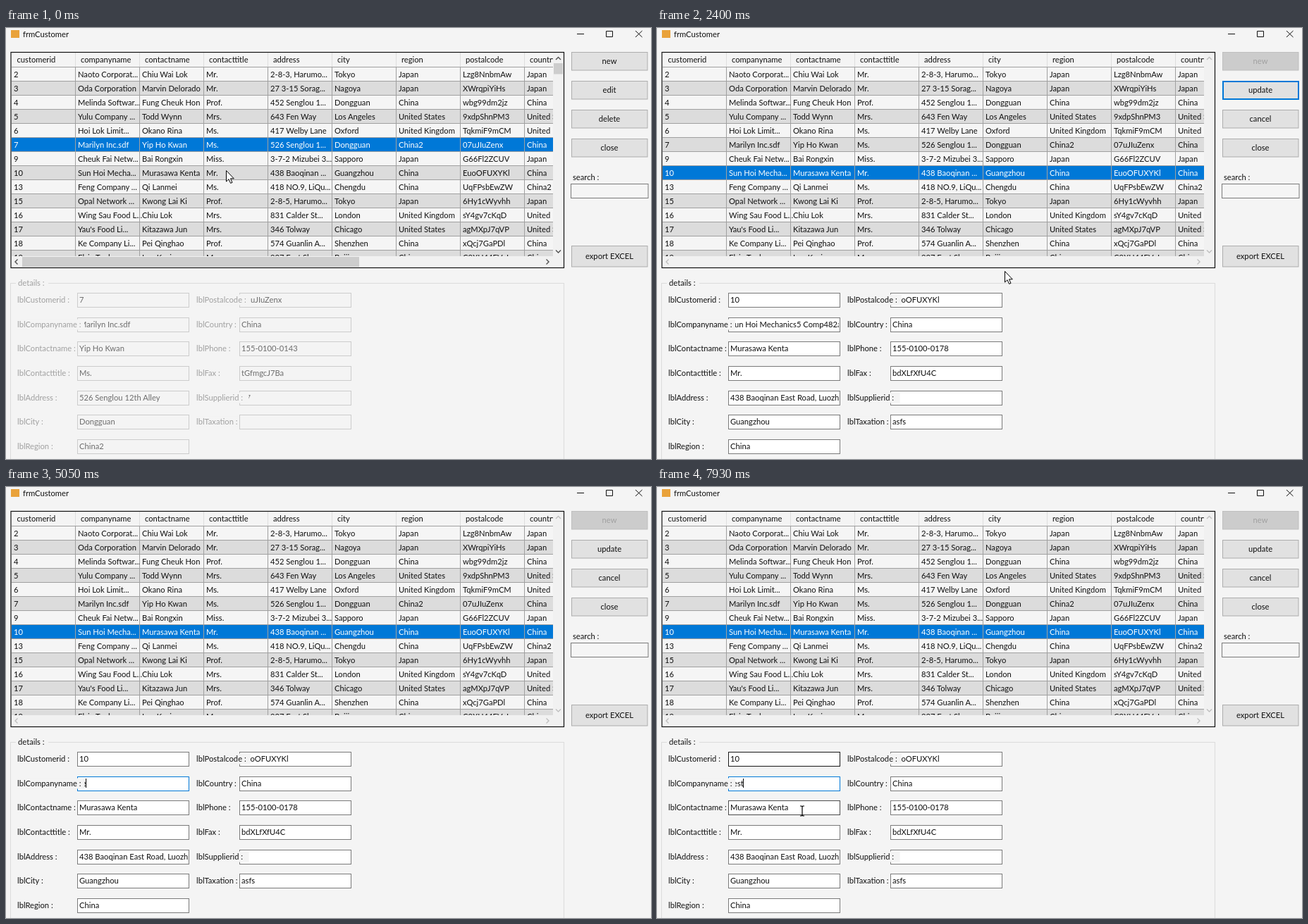
Animation of 915x612 px, one loop 8 s. Source, as an HTML page:

```html
<!DOCTYPE html>
<html lang="en">
<head>
<meta charset="utf-8">
<title>frmCustomer</title>
<style>
  html, body { margin: 0; width: 100%; height: 100%; overflow: hidden; background: #f4f4f4; }
  svg { display: block; }
  text { font: 11.2px Lato, "Open Sans", sans-serif; white-space: pre; }
</style>
</head>
<body>
<svg id="stage" width="915" height="612" viewBox="0 0 915 612"></svg>
<script>
const stage = document.getElementById("stage");
const LOOP = 8000;
const BG = "#f4f4f4", BLUE = "#0078d7", INK = "#111", HOVER = "#171717", FADE = "#4c4c4c";

const HEADERS = ["customerid", "companyname", "contactname", "contacttitle", "address", "city", "region", "postalcode", "country"];
const EDGES = [8, 99, 190, 281, 372, 463, 554, 645, 736];
const ROWS = `2|Naoto Corporat...|Chiu Wai Lok|Mr.|2-8-3, Harumo...|Tokyo|Japan|Lzg8NnbmAw|Japan
3|Oda Corporation|Marvin Delorado|Mr.|27 3-15 Sorag...|Nagoya|Japan|XWrqpiYiHs|Japan
4|Melinda Softwar...|Fung Cheuk Hon|Prof.|452 Senglou 1...|Dongguan|China|wbg99dm2jz|China
5|Yulu Company ...|Todd Wynn|Mrs.|643 Fen Way|Los Angeles|United States|9xdpShnPM3|United States
6|Hoi Lok Limit...|Okano Rina|Ms.|417 Welby Lane|Oxford|United Kingdom|TqkmiF9mCM|United Kingdom
7|Marilyn Inc.sdf|Yip Ho Kwan|Ms.|526 Senglou 1...|Dongguan|China2|07uJIuZenx|China
9|Cheuk Fai Netw...|Bai Rongxin|Miss.|3-7-2 Mizubei 3...|Sapporo|Japan|G66Fl2ZCUV|Japan
10|Sun Hoi Mecha...|Murasawa Kenta|Mr.|438 Baoqinan ...|Guangzhou|China|EuoOFUXYKl|China
13|Feng Company ...|Qi Lanmei|Ms.|418 NO.9, LiQu...|Chengdu|China|UqFPsbEwZW|China2
15|Opal Network ...|Kwong Lai Ki|Prof.|2-8-5, Harumo...|Tokyo|Japan|6Hy1cWyvhh|Japan
16|Wing Sau Food L...|Chiu Lok|Mrs.|831 Calder St...|London|United Kingdom|sY4gv7cKqD|United Kingdom
17|Yau's Food Li...|Kitazawa Jun|Mrs.|346 Tolway|Chicago|United States|agMXpJ7qVP|United States
18|Ke Company Li...|Pei Qinghao|Prof.|574 Guanlin A...|Shenzhen|China|xQcj7GaPDl|China
19|Elsie Tool...|Luo Kexin|Ms.|927 East Shan...|Beijing|China|C9XU44EVuL|China`
  .split("\n").map(line => line.split("|"));

const FIELDS = ["Customerid", "Companyname", "Contactname", "Contacttitle", "Address", "City", "Region",
  "Postalcode", "Country", "Phone", "Fax", "Supplierid", "Taxation"];
// Right edge of the labels that overlap their text box
const COVER = { Companyname: 111, Contactname: 101, Postalcode: 347, Supplierid: 344.5, Taxation: 331 };
const COMPANY = "Sun Hoi Mechanics5 Comp482any Limited";
const RECORDS = {
  7: ["7", "Marilyn Inc.sdf", "Yip Ho Kwan", "Ms.", "526 Senglou 12th Alley", "Dongguan", "China2",
    "07uJIuZenx", "China", "155-0100-0143", "tGfmgcJ7Ba", "17", ""],
  10: ["10", COMPANY, "Murasawa Kenta", "Mr.", "438 Baoqinan East Road, Luozhu", "Guangzhou", "China",
    "EuoOFUXYKl", "China", "155-0100-0178", "bdXLfXfU4C", "", "asfs"]
};

// Each step overrides part of the running state
const STEPS = [
  [0, { id: 7, pointer: [312, 202], borders: {}, caret: 0 }],
  [250, { id: 10 }],
  [1320, { pointer: [737, 126] }],
  [1570, { pointer: [852, 82], hot: true }],
  [1850, { newOff: true }],
  [2130, { editing: true, hot: false, focused: true, pointer: [709, 187] }],
  [2400, { pointer: [493, 345] }],
  [2680, { pointer: [304, 395], borders: { Postalcode: HOVER } }],
  [2950, { pointer: [294, 402], borders: { Postalcode: FADE } }],
  [3210, { pointer: [286, 415], borders: {} }],
  [3460, { pointer: [231, 423], beam: true, borders: { Companyname: FADE } }],
  [3710, { focused: false, borders: { Companyname: BLUE } }],
  [3990, { pointer: [286, 415], beam: false }],
  [4530, { atEnd: true, caret: 256.5 }],
  [4790, { selected: true, caret: 0 }],
  [5050, { atEnd: false, selected: false, company: "te", caret: 113.5, pointer: null }],
  [5310, { company: "tes", caret: 118.5 }],
  [5840, { caret: 0 }],
  [6370, { company: "test", caret: 122.5, pointer: [436, 466], borders: { Companyname: BLUE, Phone: HOVER } }],
  [6630, { pointer: [455, 446] }],
  [6880, { caret: 0, pointer: [705, 290], borders: { Companyname: BLUE, Phone: FADE } }],
  [7160, { pointer: [839, 148], borders: { Companyname: BLUE, Phone: "#666" } }],
  [7410, { caret: 122.5, pointer: [283, 438], borders: { Companyname: BLUE } }],
  [7680, { pointer: [200, 387], beam: true, borders: { Companyname: BLUE, Customerid: HOVER } }],
  [7930, { pointer: [206, 460], borders: { Companyname: BLUE, Customerid: HOVER, Contactname: FADE } }]
];

const text = (x, y, s, fill = INK, anchor = "start") =>
  `<text x="${x}" y="${y}" fill="${fill}" text-anchor="${anchor}">${s}</text>`;
const rect = (x, y, w, h, fill, stroke = "none", sw = 1) =>
  `<rect x="${x}" y="${y}" width="${w}" height="${h}" fill="${fill}" stroke="${stroke}" stroke-width="${sw}"/>`;
const path = (d, stroke, sw = 1, fill = "none") =>
  `<path d="${d}" fill="${fill}" stroke="${stroke}" stroke-width="${sw}"/>`;
// Content clipped to a box but placed in stage coordinates
const clipped = (x, y, w, h, body) =>
  `<svg x="${x}" y="${y}" width="${w}" height="${h}" viewBox="${x} ${y} ${w} ${h}">${body}</svg>`;

function titleBar() {
  return rect(7, 3, 12, 11, "#e9a23b") + text(24, 13, "frmCustomer") +
    path("M810 8.5H820M851.5 4.5H860.5V12.5H851.5ZM893 4L902.5 13M902.5 4L893 13", "#111");
}

function table(s) {
  let body = HEADERS.map((h, i) => text(EDGES[i] + (i ? 7 : 7.5), 49, h)).join("");
  ROWS.forEach((row, r) => {
    const y = 56 + r * 20, on = row[0] == s.id;
    body += rect(8, y, 768, 20, on ? BLUE : r % 2 ? "#dcdcdc" : "#f5f5f5");
    body += row.map((c, i) => text(EDGES[i] + 3, y + 13.5, c, on ? "#fff" : INK)).join("");
    body += path(`M8 ${y + 19.5}H776`, "#a0a0a0");
  });
  const columns = EDGES.slice(1).map(x => x - .5);
  body += path(columns.map(x => `M${x} 56V324`).join(""), "#a0a0a0");
  body += path(columns.map(x => `M${x} 35V55`).join(""), "#dedede") + path("M8 55.5H776", "#a0a0a0");
  return clipped(8, 35, 768, 289, body) + scrollBars(s) + rect(7, 34.5, 784.5, 306, "none", "#111", 1.2);
}

function scrollBars(s) {
  const arrows = "M780 45L783.5 41.5L787 45M780 315.5L783.5 319L787 315.5M16.5 328.5L13 332L16.5 335.5M766.5 328.5L770 332L766.5 335.5";
  return rect(776, 35, 15, 305, "#f1f1f1") + rect(8, 324, 768, 16, "#f1f1f1") +
    (s.editing ? "" : rect(777, 50, 13, 15.5, "#cdcdcd") + rect(23, 325, 478, 14, "#cdcdcd")) +
    path(arrows, s.editing ? "#bfbfbf" : "#505050", 1.4);
}

function button(y, label, { h = 26, off, hot, focused } = {}) {
  const fill = off ? "#cccccc" : hot ? "#e5f1fb" : "#e1e1e1";
  const stroke = off ? "#bfbfbf" : hot || focused ? BLUE : "#adadad";
  const box = focused ? rect(803, y + 1, 107, h - 1, fill, stroke, 2) : rect(802.5, y + .5, 107.5, h - .5, fill, stroke);
  return box + text(856, y + h / 2 + 4, label, off ? "#a0a0a0" : INK, "middle");
}

function sidebar(s) {
  return button(34, "new", { off: s.newOff }) +
    button(75, s.editing ? "update" : "edit", { hot: s.hot, focused: s.focused }) +
    button(116, s.editing ? "cancel" : "delete") + button(157, "close") +
    text(804, 216, "search :") + rect(801.5, 221.5, 109.5, 20, "#f5f5f5", "#7a7a7a") +
    button(309, "export EXCEL", { h: 30 });
}

function companyText(s, y) {
  if (!s.atEnd) return text(104, y + 4, s.company || RECORDS[s.id][1], s.editing ? INK : "#6d6d6d");
  const mark = s.selected ? rect(104, y - 7, 152, 14, BLUE) : "";
  return mark + text(256, y + 4, COMPANY, s.selected ? "#fff" : INK, "end");
}

function field(s, name, i) {
  const right = i > 6, x = right ? 331 : 101, labelX = right ? 270 : 16;
  const y = 386 + Math.round((i % 7) * 34.65);
  const ink = s.editing ? INK : "#6d6d6d";
  const stroke = s.borders[name] || (s.editing ? "#7a7a7a" : "#cccccc");
  const value = name == "Companyname" ? companyText(s, y) : text(x + 3, y + 4, RECORDS[s.id][i], ink);
  const cover = COVER[name] ? rect(labelX, y - 7.5, COVER[name] - labelX, 15, BG) : "";
  return rect(x + .5, y - 9.5, 158, 20, s.editing ? "#fff" : BG, stroke) +
    clipped(x + 1, y - 9, 156, 19, value) + cover +
    text(labelX, y + 4, `lbl${name} :`, s.editing ? INK : "#a0a0a0");
}

function details(s) {
  return rect(6.5, 362.5, 785, 270, "none", "#dcdcdc") + rect(14, 358, 46, 9, BG) +
    text(17, 366, "details :", s.editing ? INK : "#a0a0a0") +
    FIELDS.map((name, i) => field(s, name, i)).join("") +
    (s.caret ? path(`M${s.caret} 414V427`, "#000") : "");
}

function pointer(s) {
  if (!s.pointer) return "";
  const [x, y] = s.pointer;
  const shape = s.beam
    ? path("M-3 -7H-1L0 -6L1 -7H3M0 -6V6M-3 7H-1L0 6L1 7H3", "#000", 1.2)
    : path("M.5 .5V16L4 12.7L6.6 18.4L9 17.4L6.5 11.8H11.3Z", "#000", 1, "#fff");
  return `<g transform="translate(${x} ${y})">${shape}</g>`;
}

let shown = -1;
function render(time) {
  const passed = STEPS.filter(step => step[0] <= time);
  if (passed.length !== shown) {
    shown = passed.length;
    const s = Object.assign({}, ...passed.map(step => step[1]));
    stage.innerHTML = rect(0, 0, 915, 612, BG) + titleBar() + table(s) + sidebar(s) + details(s) + pointer(s);
  }
}

const start = performance.now();
function tick() {
  render((performance.now() - start) % LOOP);
  requestAnimationFrame(tick);
}
tick();
</script>
</body>
</html>
```
